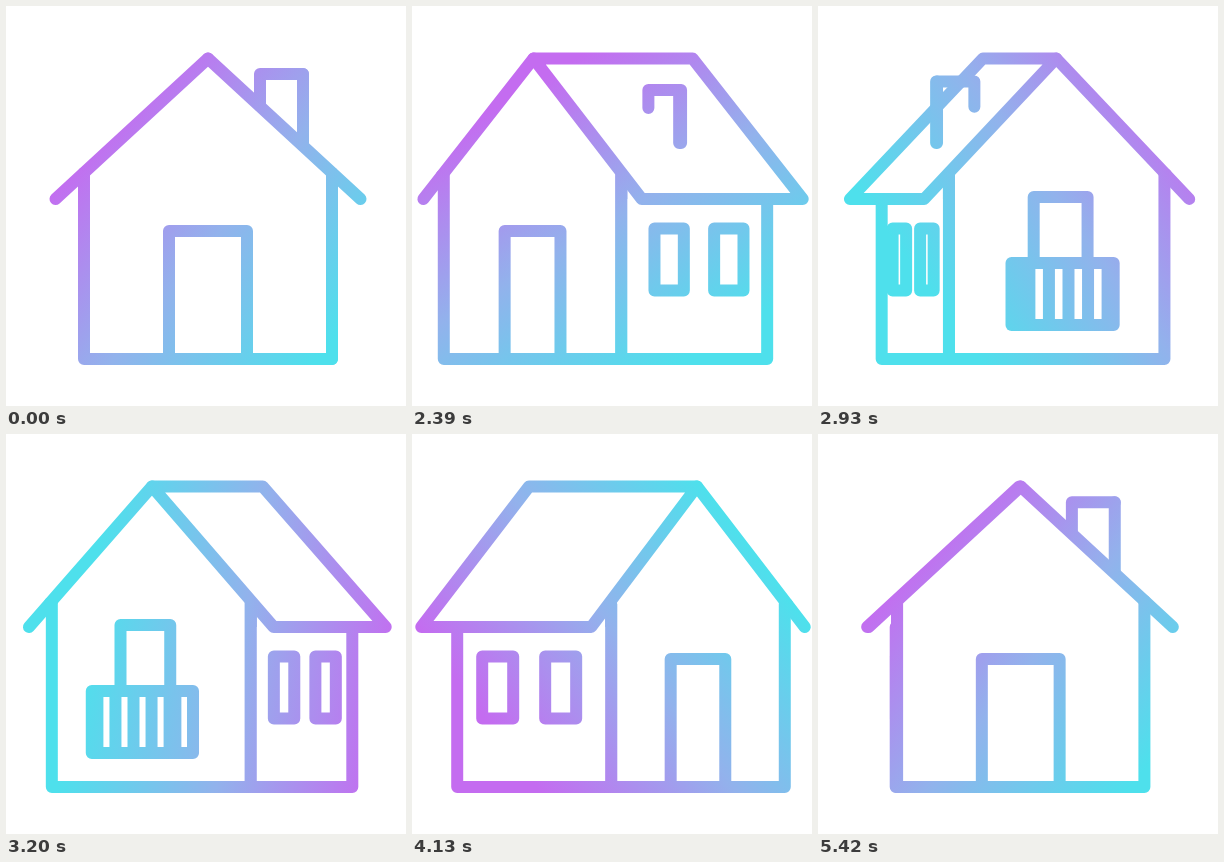
Recreate the animation shown at these times as an HTML page with a canvas. Size 400 by 400 pixels, loop 5.45 s.

```html
<!DOCTYPE html>
<html lang="en">
<head>
<meta charset="utf-8">
<title>Turning house</title>
<style>
html, body { margin: 0; width: 100%; height: 100%; overflow: hidden; background: #fff; }
canvas { display: block; }
</style>
</head>
<body>
<canvas id="stage" width="400" height="400"></canvas>
<script>
const ctx = document.getElementById('stage').getContext('2d');
const LOOP = 5450, HOLD = 2000, STEP = 30, SPIN = 3570;
const COLORS = ['#c46cf0', '#92b2ec', '#4ee0ec'];
const WALL = 124, EAVE = 152.5, RIDGE_Y = 52.5, EAVE_Y = 193, FLOOR = 353;

// Cubic easing with control points (.18, 0) and (.257, 1)
function ease(x) {
  let lo = 0, hi = 1, s;
  for (let i = 0; i < 24; i++) {
    s = (lo + hi) / 2;
    const r = 1 - s;
    if (3 * .18 * s * r * r + 3 * .257 * s * s * r + s * s * s < x) lo = s;
    else hi = s;
  }
  return s * s * (3 - 2 * s);
}

// Linear interpolation through equally spaced keys
function along(keys, p) {
  const i = Math.min(Math.floor(p), keys.length - 2);
  return keys[i] + (keys[i + 1] - keys[i]) * (p - i);
}

function setGradient(quarter) {
  const a = along([40, 80, 162, 246, 400], quarter) * Math.PI / 180;
  const shift = along([22, -10, -45, -10, 22], quarter);
  const dx = Math.cos(a), dy = Math.sin(a);
  const at = r => [202 + dx * r, 205 + dy * r];
  const g = ctx.createLinearGradient(...at(shift - 157), ...at(shift + 157));
  COLORS.forEach((color, i) => g.addColorStop(i / 2, color));
  ctx.strokeStyle = g;
}

function trace(points, closed) {
  ctx.beginPath();
  points.forEach(p => ctx.lineTo(...p));
  if (closed) ctx.closePath();
}
function line(...points) { trace(points); ctx.stroke(); }
function fill(...points) { trace(points, true); ctx.fill(); }
function shape(...points) { trace(points, true); ctx.fill(); ctx.stroke(); }
function box(x1, y1, x2, y2) { shape([x1, y1], [x2, y1], [x2, y2], [x1, y2]); }

// u runs from 0 to 8, one unit for each eighth of a turn
function drawHouse(u) {
  const half = u % 4, g = half < 2 ? half : 4 - half;
  const pick = (flat, diagonal, side) => along([flat, diagonal, side], g);

  const front = u < 2 || u >= 6;
  const dir = (u < 4) === front ? -1 : 1;   // side of the stage the visible gable is on
  const near = -dir;                        // gable edge that joins the visible long wall
  const c = pick(1, .7, 0), center = pick(202, 201, 200.5);
  const X = (w, z) => center + w * c + dir * z;

  const zWall = pick(0, 85, 147), zBack = pick(0, 69, 147);
  const zRidge = pick(0, 84, 124), zEave = pick(0, 85, 174);
  const wallTop = pick(167, 170, 190);
  const reach = pick(0, 27, u < 4 ? 14 : 25);

  function chimney() {
    const s = u < 4 ? near : -near, top = pick(68, 85, 80);
    const a = pick(0, 2, 58), b = pick(0, 0, 29);
    const zVis = front ? a : b, zHid = front ? -b : -a;
    const outer = X(s * 95, zVis), inner = X(s * 52, zVis), far = X(s * 95, zHid);
    line([far, 137], [far, top], [outer, top], [outer, 137]);
    line([outer, top], [inner, top], [inner, pick(100, 102, 106)]);
  }

  function balcony(z, out) {
    const edge = X(near * 52, z + out);
    box(X(near * 52, z), 257, edge, 319);
    box(X(-near * 52, z + out), 257, edge, 319);
    for (let i = -2; i <= 2; i++) {
      const x = X(i * 22.5, z + out);
      line([x, 257], [x, 319]);
    }
  }

  function door(w, z, top, bottom) {
    const l = X(-w, z), r = X(w, z);
    line([l, bottom], [l, top], [r, top], [r, bottom]);
  }

  if (u >= 4) chimney();
  if (front) balcony(-zBack, -reach);

  // Gable wall; its far edge bends over to meet the roof
  const n = near * WALL, corner = X(n, zWall), far = X(-n, zWall), apex = [X(0, zRidge), RIDGE_Y];
  const k = (wallTop - RIDGE_Y) / (EAVE_Y - RIDGE_Y);
  const joint = X(-near * EAVE * k, zRidge + (zEave - zRidge) * k);
  fill([corner, FLOOR], [corner, wallTop], apex, [far, wallTop], [far, FLOOR]);
  line([corner, wallTop], [corner, FLOOR], [far, FLOOR], [far, wallTop], [joint, wallTop]);
  if (front) {
    door(39, zWall, 225, FLOOR);
  } else {
    door(31, zWall + pick(0, 9, 0), pick(191, 191, 201), 260);
    balcony(zWall, reach);
  }

  // Long wall with two windows
  const end = X(n, -zBack);
  fill([corner, FLOOR], [end, FLOOR], [end, EAVE_Y], [corner, EAVE_Y]);
  line([corner, wallTop], [corner, FLOOR], [end, FLOOR], [end, EAVE_Y]);
  const mid = (zWall - zBack) / 2 - pick(0, 5, 0), w1 = pick(0, 16, 44), w2 = pick(0, 47, 107);
  for (const s of [-1, 1]) box(X(n, mid + s * w1), 222.5, X(n, mid + s * w2), 284.5);

  // Roof
  const e = near * EAVE;
  shape(apex, [X(e, zEave), EAVE_Y], [X(e, -zEave), EAVE_Y], [X(0, -zRidge), RIDGE_Y]);
  line(apex, [X(-e, zEave), EAVE_Y]);
  if (u < 4) chimney();
}

function frame(now) {
  const t = now % LOOP;
  const spin = Math.max(0, Math.floor((t - HOLD) / STEP) * STEP);
  const u = spin ? 8 * ease(spin / SPIN) : 0;
  ctx.fillStyle = '#fff';
  ctx.fillRect(0, 0, 400, 400);
  ctx.lineWidth = 12;
  ctx.lineCap = ctx.lineJoin = 'round';
  setGradient(u / 2);
  drawHouse(u);
  requestAnimationFrame(frame);
}
frame(performance.now());
</script>
</body>
</html>
```
